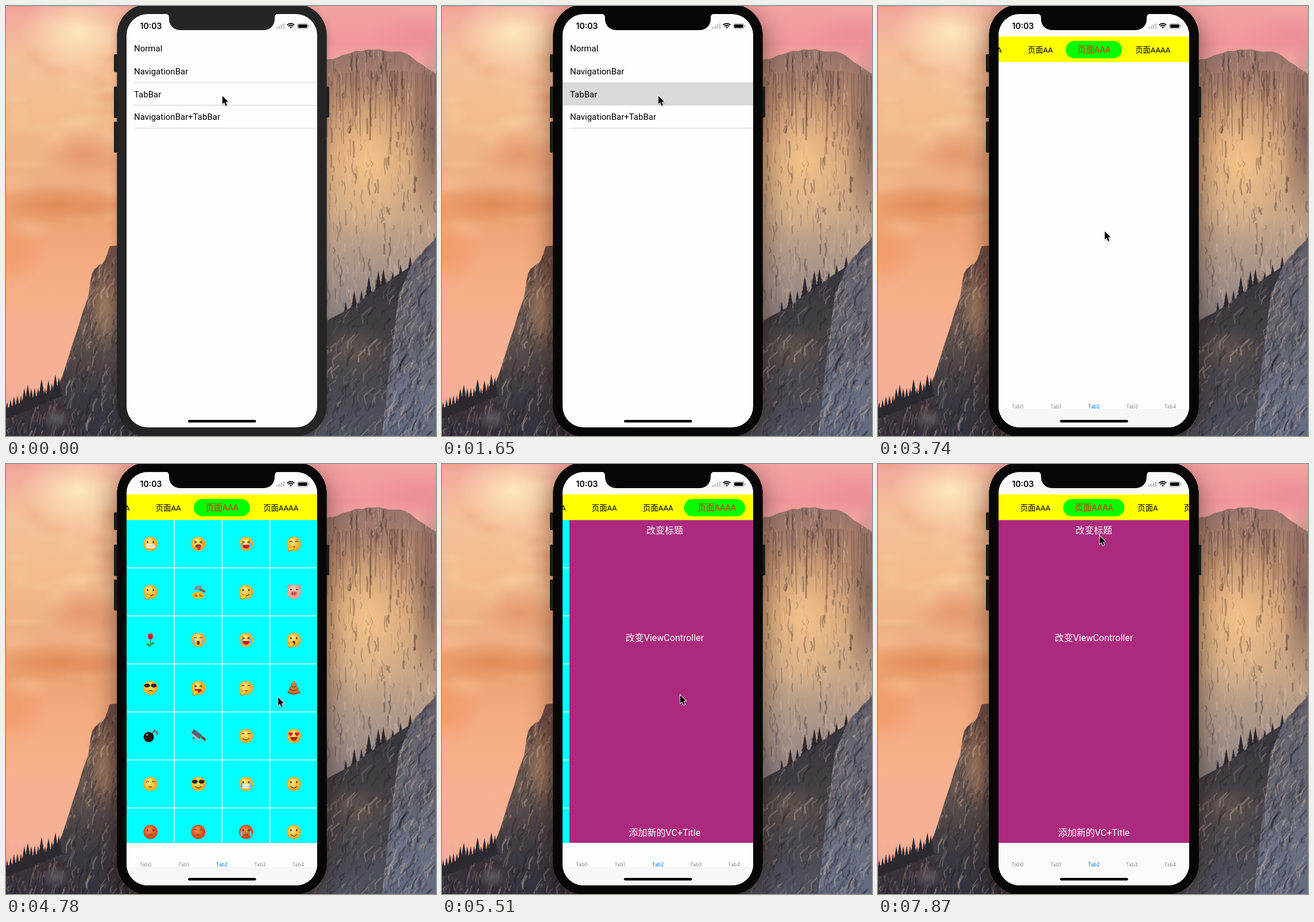
An HTML page with a canvas that plays this animation: 749 by 748 pixels, repeating every 8 s.

```html
<!DOCTYPE html>
<html lang="zh">
<head>
<meta charset="utf-8">
<title>Tab pages</title>
<style>
html, body { margin: 0; width: 100%; height: 100%; overflow: hidden; }
canvas { display: block; }
</style>
</head>
<body>
<canvas id="stage" width="749" height="748"></canvas>
<script>
const W = 749, H = 748, LOOP = 8000;
const SANS = 'Roboto, "Noto Sans CJK SC", "Noto Sans CJK", sans-serif';
const INTER = 'Inter, sans-serif';
const screen = { x: 210, y: 14, w: 332, h: 719 };
const page = { y: 97.5, h: 561.5 };
const view = document.getElementById('stage').getContext('2d');
let c = view;

// ---------- helpers ----------
const mix = (a, b, p) => a + (b - a) * p;
const clamp = p => Math.max(0, Math.min(1, p));
const smooth = p => (p = clamp(p)) * p * (3 - 2 * p);
const easeOut = (p, power) => 1 - (1 - clamp(p)) ** power;

function rect(x, y, w, h, fill) {
  c.fillStyle = fill;
  c.fillRect(x, y, w, h);
}
function round(x, y, w, h, r, fill) {
  c.beginPath();
  c.roundRect(x, y, w, h, r);
  c.fillStyle = fill;
  c.fill();
}
function trace(pts) {
  c.beginPath();
  pts.forEach(([x, y]) => c.lineTo(x, y));
  c.closePath();
}
function poly(pts, fill) {
  trace(pts);
  c.fillStyle = fill;
  c.fill();
}
function oval(x, y, rx, ry, fill, turn = 0) {
  c.beginPath();
  c.ellipse(x, y, rx, ry, turn, 0, 7);
  c.fillStyle = fill;
  c.fill();
}
function line(pts, color, width) {
  c.beginPath();
  pts.forEach(([x, y]) => c.lineTo(x, y));
  c.strokeStyle = color;
  c.lineWidth = width;
  c.stroke();
}
function arc(x, y, r, from, to, color, width) {
  c.beginPath();
  c.arc(x, y, r, from * Math.PI, to * Math.PI);
  c.strokeStyle = color;
  c.lineWidth = width;
  c.stroke();
}
function text(str, x, y, size, fill, align = 'center', font = SANS, weight = 400) {
  c.font = `${weight} ${size}px ${font}`;
  c.textAlign = align;
  c.fillStyle = fill;
  c.fillText(str, x, y);
}
function fade(y0, y1, colors) {
  const g = c.createLinearGradient(0, y0, 0, y1);
  colors.forEach((col, i) => g.addColorStop(i / (colors.length - 1), col));
  return g;
}

// ---------- landscape, painted once ----------
let seed = 7;
const rnd = (a, b) => {
  seed = (seed * 16807) % 2147483647;
  return a + (b - a) * seed / 2147483647;
};
function glow(x, y, rx, ry, rgb, alpha) {
  c.save();
  c.translate(x, y);
  c.scale(rx, ry);
  const g = c.createRadialGradient(0, 0, 0, 0, 0, 1);
  g.addColorStop(0, `rgba(${rgb},${alpha})`);
  g.addColorStop(1, `rgba(${rgb},0)`);
  oval(0, 0, 1, 1, g);
  c.restore();
}
// Fills everything below a ridge of key points, then scatters leaning cracks and highlights.
function rock(keys, colors, cracks, lean, light) {
  const x0 = keys[0][0], x1 = keys[keys.length - 1][0];
  const top = Math.min(...keys.map(k => k[1]));
  const ridge = [[x0, H]];
  keys.slice(1).forEach(([bx, by], i) => {
    const [ax, ay] = keys[i];
    for (let p = 0; p < 1; p += 0.2) ridge.push([mix(ax, bx, p), mix(ay, by, p) + rnd(-2, 2)]);
  });
  ridge.push(keys[keys.length - 1], [x1, H]);
  c.save();
  trace(ridge);
  c.clip();
  rect(x0, top - 3, x1 - x0, H, fade(top, H, colors));
  if (light) glow(...light);
  for (let i = 0; i < cracks; i++) {
    const x = rnd(x0, x1), y = rnd(top, H), len = rnd(4, 30);
    const tone = rnd(0, 1) < 0.6 ? '25,20,28' : '240,205,180';
    line([[x, y], [x + lean * len + rnd(-3, 3), y + len / 2], [x + lean * len, y + len]],
      `rgba(${tone},${rnd(0.06, 0.32)})`, rnd(0.7, 3.2));
  }
  c.restore();
}
function tree(x, base, h) {
  for (let i = 0; i < 4; i++) {
    const y = base - h + i * h / 5, w = h * (0.07 + i * 0.045);
    poly([[x, y], [x + w, y + h * 0.4], [x - w, y + h * 0.4]], '#2c2930');
  }
}
function paintLandscape() {
  rect(0, 0, 400, H, fade(0, H, ['#f1a79c', '#f5c199', '#f2bc90', '#efb086', '#eea474',
    '#f5ad84', '#f6b290', '#f5b096', '#efa295']));
  for (let i = 0; i < 40; i++)
    glow(rnd(0, 200), rnd(0, 400), rnd(20, 60), rnd(8, 30), i % 2 ? '250,210,165' : '228,150,110', 0.3);
  glow(125, 45, 100, 70, '255,240,195', 0.85);
  glow(135, 258, 75, 42, '222,135,88', 0.6);
  glow(90, 345, 130, 36, '220,132,78', 0.8);
  glow(10, 430, 60, 60, '240,145,95', 0.6);
  rect(400, 0, 349, 200, fade(0, 130, ['#f3a3a0', '#f0979b', '#f4b3a4']));
  glow(720, 50, 90, 40, '228,125,140', 0.4);

  // granite dome with vertical stains below its cap
  rock([[500, 120], [562, 93], [600, 80], [650, 75], [695, 82], [749, 118]],
    ['#94726a', '#b88a6e', '#cd9f78', '#c8a687', '#a89488', '#857a7c', '#6b6269', '#5c5660'], 1100, 0.02,
    [630, 270, 95, 140, '250,200,140', 0.85]);
  glow(745, 230, 45, 170, '75,58,65', 0.55);
  for (let x = 562; x < W; x += rnd(3, 9)) {
    const y = 112 + (x - 655) ** 2 / 900;
    line([[x, y], [x + rnd(-3, 3), y + rnd(20, 130)]], `rgba(75,48,45,${rnd(0.15, 0.45)})`, rnd(1, 4));
  }

  // dark slope with its tree line, and the grey face in front
  const slope = x => 535 - (x - 585) * 0.69;
  for (let x = 592; x < 715; x += rnd(8, 18)) tree(x, slope(x) + 4, rnd(16, 38));
  rock([[500, 580], [585, slope(585)], [706, slope(706)], [749, 405]],
    ['#35323a', '#3b3940', '#454146', '#4b4950', '#50535f'], 750, -0.5,
    [610, 600, 60, 45, '125,102,88', 0.5]);
  rock([[655, 748], [670, 610], [684, 505], [706, 450], [749, 402]],
    ['#605d67', '#676772', '#62636f', '#6b7082', '#636a80'], 650, -0.4);

  // left cliff and forest
  rock([[60, 748], [78, 682], [98, 643], [143, 505], [150, 463], [173, 442], [181, 417], [260, 410]],
    ['#73504a', '#6b5149', '#6c5a54', '#524848', '#3c3a42', '#34343e'], 750, -0.3,
    [172, 525, 28, 85, '176,132,98', 0.7]);
  rock([[0, 700], [70, 672], [95, 690], [130, 748]], ['#43343a', '#34323d'], 150, -0.2);
  for (let x = 2; x < 95; x += 6) tree(x, 718 - x * 0.42, rnd(24, 46));
  glow(87, 718, 26, 20, '105,100,108', 0.8);
}

// ---------- phone ----------
function phone(focused) {
  const body = focused ? '#070707' : '#252525', side = focused ? '#1c1c1c' : '#202020';
  c.save();
  c.shadowColor = `rgba(35,10,0,${focused ? 0.55 : 0.25})`;
  c.shadowBlur = focused ? 44 : 14;
  c.shadowOffsetY = focused ? 14 : 4;
  round(193.5, -3, 365, 751.5, 54, body);
  c.restore();
  [[188, 84, 31], [188, 140, 55], [188, 201, 54], [557, 140, 54]]
    .forEach(([x, y, h]) => round(x, y, 6, h, 2, side));
  round(193.5, -3, 365, 751.5, 54, body);
  return body;
}
function notch(body) {
  c.beginPath();
  c.moveTo(278, 13);
  c.quadraticCurveTo(284, 14, 284, 21);
  c.arcTo(284, 42, 304, 42, 19);
  c.arcTo(468, 42, 468, 21, 19);
  c.lineTo(468, 21);
  c.quadraticCurveTo(468, 14, 474, 13);
  c.fillStyle = body;
  c.fill();
}
function statusBar() {
  text('10:03', 252.5, 40, 14, '#000', 'center', INTER, 600);
  for (let i = 0; i < 4; i++) round(470.5 + i * 4, 36 - i * 2, 2.8, 4 + i * 2, 0.8, '#c9c9c9');
  [9, 5.8, 2].forEach(r => arc(496, 39.5, r, 1.25, 1.75, '#000', 2));
  c.beginPath();
  c.roundRect(507.5, 30.5, 18.5, 9, 2.5);
  c.strokeStyle = '#9a9a9a';
  c.lineWidth = 1;
  c.stroke();
  round(509, 32, 15.5, 6, 1.3, '#000');
  round(527, 33.5, 1.4, 3, 0.7, '#9a9a9a');
}

// ---------- pages ----------
function list(pressed) {
  const row = 39.83;
  if (pressed) rect(210, 133, 332, row, '#d9d9d9');
  ['Normal', 'NavigationBar', 'TabBar', 'NavigationBar+TabBar'].forEach((name, i) => {
    text(name, 223, 79 + i * row, 15, '#000', 'left');
    if (i) rect(223, Math.floor(93.3 + i * row), 319, 1, '#d2d2d4');
  });
}
function tabBar(selected, top, fill) {
  rect(210, top, 332, 733 - top, fill);
  for (let i = 0; i < 5; i++)
    text('Tab' + i, 210 + 332 * (i + 0.5) / 5, 699.5, 8.8, i === selected ? '#0a7bf0' : '#8b8b8b',
      'center', INTER);
}

// Titles run A, AA, AAA, AAAA and repeat, with even gaps between them.
const GAP = 45;
const letters = i => i % 4 + 1;
const titleWidth = i => 26.6 + 8.8 * letters(i);
const titleStep = i => (titleWidth(i) + titleWidth(i + 1)) / 2 + GAP;
function strip(turn, scroll) {
  const shift = scroll * titleStep(2);
  rect(210, 53, 332, 44.5, '#ff0');
  const w = mix(titleWidth(2), titleWidth(3), turn) + GAP;
  round(376 + turn * titleStep(2) - shift - w / 2, 61, w, 30, 15, '#0f0');
  for (let i = 0, x = 198; i < 6; x += titleStep(i++)) {
    const on = i === 2 ? 1 - turn : i === 3 ? turn : 0;
    text('页面' + 'A'.repeat(letters(i)), x - shift, 80.5, 13.3 * (1 + 0.09 * on), on > 0.5 ? '#e8200a' : '#000');
  }
}

// Eyes, mouth, then extras (h hand, w tear, r red); capitals are objects.
const icons = ('dg st slw c-h dsh K dsh P R cow slw doh gf slh c-h O B C cs hl ' +
  'c- gs dgw ds dfr c-r dfwr ds').split(' ');
const INK = '#6b3508';
function ball(light, dark) {
  const g = c.createRadialGradient(-3, -5, 1, 0, 0, 13);
  g.addColorStop(0, light);
  g.addColorStop(1, dark);
  oval(0, 0, 12.3, 12.3, g);
}
function heart(x, y) {
  [-1.6, 1.6].forEach(dx => oval(x + dx, y - 1, 2.2, 2.2, '#e8152a'));
  poly([[x - 3.6, y], [x + 3.6, y], [x, y + 4]], '#e8152a');
}
const eyes = {
  d: x => oval(x, -3, 1.4, 2, INK),
  c: x => arc(x, -2, 2.4, 1.1, 1.9, INK, 1.3),
  s: x => line([[x * 1.4, -5], [x * 0.6, -3], [x * 1.4, -1]], INK, 1.4),
  g: x => oval(x * 1.15, -4, 5, 3.4, '#222'),
  h: x => heart(x * 1.1, -3)
};
const mouths = {
  g() { round(-8, 1, 16, 6.5, 3, '#fff'); line([[-8, 4], [8, 4]], '#b07a30', 0.7); },
  t() { oval(0, 4, 5, 3, INK); oval(1, 7, 3, 4, '#f0304a'); },
  s() { arc(0, 1, 6, 0.15, 0.85, INK, 1.4); },
  f() { arc(0, 9, 4.5, 1.2, 1.8, INK, 1.4); },
  o() { oval(0, 5, 2.6, 3.4, INK); },
  l() { c.beginPath(); c.arc(0, 2, 6.5, 0, Math.PI); c.fillStyle = '#b8221c'; c.fill(); },
  '-'() { line([[-3, 5], [3, 5]], INK, 1.3); }
};
const objects = {
  K() {
    oval(0, 6, 11, 6, '#f8b820');
    [-4, 4].forEach(x => line([[x - 2, 5], [x + 2, 8]], INK, 1.4));
    poly([[-8, -4], [-4, -10], [6, -11], [7, -1]], '#86909a');
    line([[3, -4], [12, 0]], '#7b4c24', 3);
  },
  P() {
    [-8, 8].forEach(x => oval(x, -8, 4, 4, '#e08c80'));
    ball('#ffd0c0', '#ee9888');
    [-5, 5].forEach(x => oval(x, -4, 1.4, 1.6, '#333'));
    oval(0, 3, 6, 4, '#dc7468');
    [-2, 2].forEach(x => oval(x, 3, 1, 1.6, '#7a2f2a'));
  },
  R() {
    line([[0, 0], [0, 12]], '#2a8a30', 1.6);
    [-1, 1].forEach(s => oval(s * 3.5, 7.5 - s, 4, 1.8, '#35a03c', -s / 2));
    oval(0, -6, 4.5, 5.5, '#e01830');
    arc(0, -7, 2.4, 0, 1, '#8e0c1c', 1);
  },
  O() {
    for (let i = 0; i < 3; i++) {
      oval(0, 7 - i * 6, 11 - i * 3, 4.5, '#8a4a1a');
      oval(0, 6 - i * 6, 10 - i * 3, 3.5, '#c87832');
    }
    poly([[-3, -7], [1, -13], [3, -7]], '#c87832');
  },
  B() {
    oval(-3, 2, 9, 9, '#151515');
    oval(-6, -2, 2.4, 2, '#777');
    line([[3, -4], [7, -9], [11, -7], [12, -2]], '#b02a20', 1.8);
  },
  C() {
    c.rotate(0.65);
    round(-13, -5, 18, 10, 1, '#59616a');
    rect(-13, 3, 18, 2, '#c3cbd2');
    round(5, -4, 10, 4, 2, '#7a4422');
    oval(-4, 8, 1.5, 2, '#d81a20');
  }
};
function icon(kind, x, y) {
  c.save();
  c.translate(x, y);
  if (objects[kind]) objects[kind]();
  else {
    const has = k => kind.indexOf(k, 2) > 0;
    has('r') ? ball('#ff9050', '#c83c08') : ball('#fff08a', '#f0a010');
    [-5, 5].forEach(eyes[kind[0]]);
    mouths[kind[1]]();
    if (has('w')) [-8, 8].forEach(ex => oval(ex, 3, 2, 5, '#6cb8f4'));
    if (has('h')) {
      oval(-5, 9, 6, 3.6, '#c87808', -0.5);
      oval(-5, 8.4, 5, 3, '#fcc838', -0.5);
    }
  }
  c.restore();
}
function grid(left) {
  const col = 83.25, row = 83.55;
  rect(left, page.y, 332, page.h, '#0ff');
  for (let i = 1; i < 4; i++) rect(left - 0.6 + i * col, page.y, 1.2, page.h, '#fff');
  for (let i = 1; i < 7; i++) rect(left, 96.4 + i * row, 332, 1.3, '#fff');
  icons.forEach((kind, i) => icon(kind, left + (i % 4 + 0.5) * col, 97 + (Math.floor(i / 4) + 0.5) * row));
}
function purplePage(left) {
  rect(left, page.y, 332, page.h, '#ab2a7e');
  [['改变标题', 121], ['改变ViewController', 308], ['添加新的VC+Title', 647]]
    .forEach(([str, y]) => text(str, left + 166, y, 16, '#fff'));
}

function pointer(x, y) {
  c.save();
  c.translate(x, y);
  trace([[0, 0], [0, 14], [3.2, 11.2], [5.6, 17], [8, 16], [5.7, 10.4], [10, 10]]);
  c.shadowColor = 'rgba(0,0,0,.35)';
  c.shadowBlur = 2;
  c.shadowOffsetY = 1;
  c.strokeStyle = '#fff';
  c.lineWidth = 1.8;
  c.stroke();
  c.shadowColor = 'transparent';
  c.fillStyle = '#000';
  c.fill();
  c.restore();
}

// ---------- timeline ----------
// Number of the n evenly spaced changes between a and b that have happened.
const count = (t, a, b, n) =>
  t < a ? 0 : Math.min(n, 1 + Math.floor((t - a) * (n - 1) / (b - a) + 0.01));

function draw(t) {
  const open = count(t, 1650, 2550, 7), rise = count(t, 3300, 3740, 4);
  const load = count(t, 4040, 5070, 8), swipe = count(t, 5210, 5950, 6), leave = count(t, 6990, 7870, 7);
  const tabbed = t >= 2850, settled = swipe === 6;

  const slide = easeOut((open - 1) / 4, 2);
  const pull = Math.max(0, load - 6);
  const turn = swipe ? easeOut(swipe / 4, 2.4) : pull * 0.03;
  const scroll = smooth((swipe - 3) / 3);
  const [mx, my] = [
    [386, 674, smooth((open - 3) / 4)],
    [395, 392, smooth(rise / 4)],
    [474, 406, smooth(load / 6)],
    [415, 402, (pull + Math.min(3, swipe)) / 5],
    [402, 418, scroll],
    [386, 125, smooth(leave / 7)]
  ].reduce(([x, y], [tx, ty, p]) => [mix(x, tx, p), mix(y, ty, p)], [377, 156.5]);

  c.drawImage(landscape, 0, 0);
  const body = phone(t >= 750);
  c.save();
  c.beginPath();
  c.roundRect(screen.x, screen.y, screen.w, screen.h, 37);
  c.clip();
  const paper = settled ? '#fafafa' : '#fefefe';
  rect(screen.x, screen.y, screen.w, screen.h, paper);
  if (slide < 1) list(open === 1);
  if (slide > 0) {
    c.save();
    c.translate(0, (1 - slide) * screen.h);
    rect(screen.x, screen.y, screen.w, screen.h, paper);
    tabBar(tabbed ? 2 : 0, tabbed ? 701 : 662, settled ? paper : '#f7f7f7');
    c.restore();
  }
  if (tabbed) {
    strip(turn, scroll);
    if (load && turn < 1) grid(210 - 332 * turn);
    if (turn > 0) purplePage(210 + 332 * (1 - turn));
  }
  statusBar();
  round(317, 720, 118.5, 4.6, 2.3, '#000');
  c.restore();
  notch(body);
  pointer(mx, my);
}

const landscape = document.createElement('canvas');
landscape.width = W;
landscape.height = H;
c = landscape.getContext('2d');
paintLandscape();
c = view;

const start = performance.now();
function frame() {
  draw((performance.now() - start) % LOOP);
  requestAnimationFrame(frame);
}
frame();
</script>
</body>
</html>
```
